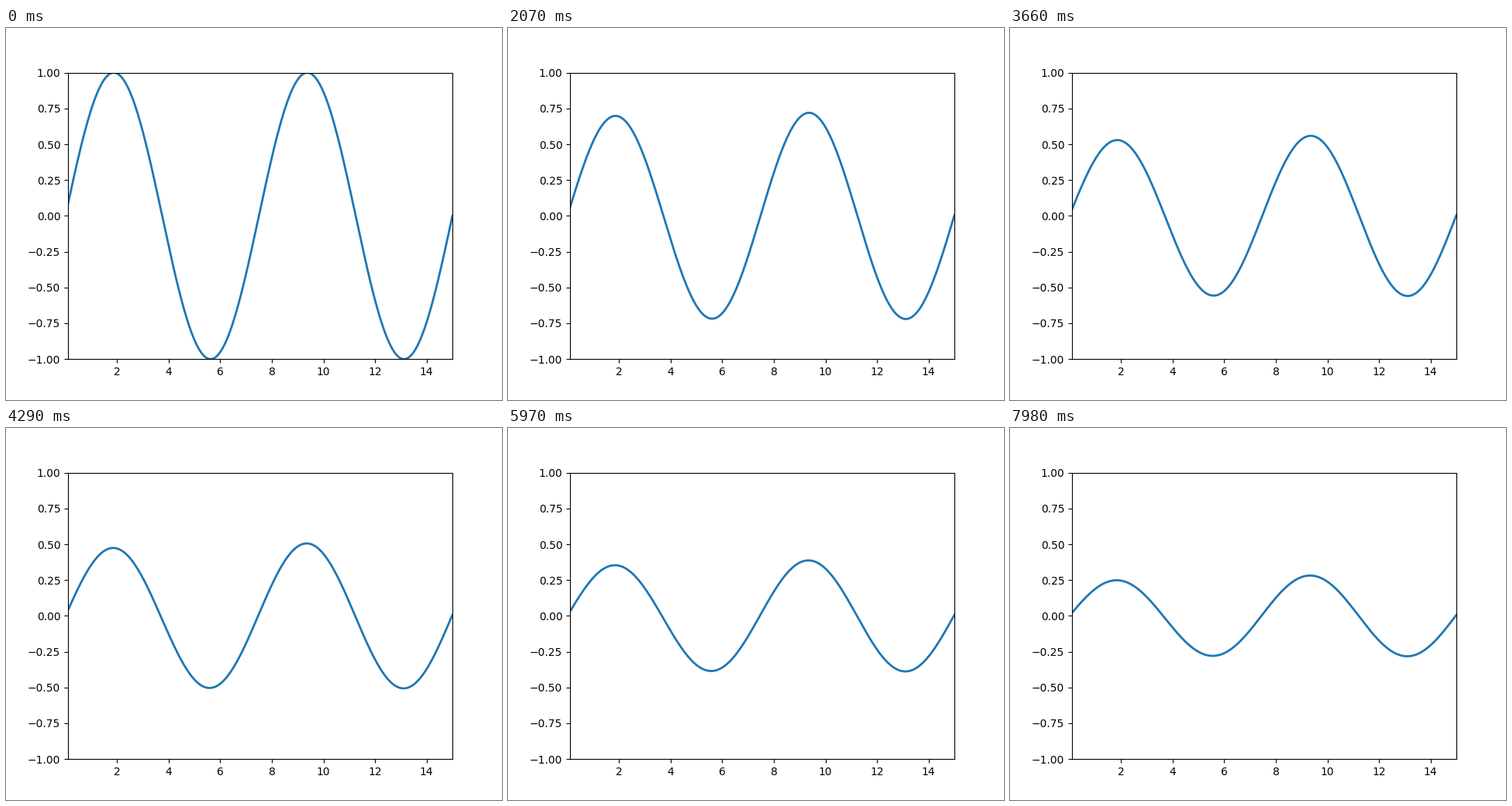
Animation, 640 px wide and 480 px high, one loop 8 s. Source, as a matplotlib script:

```python
import numpy as np
import matplotlib.pyplot as plt
from matplotlib.animation import FuncAnimation

LOOP_MS = 8000
FRAMES = 267
R_MIN, R_MAX = 0.1, 15.0
K = 4 * np.pi / R_MAX   # two full waves across the radius
DECAY = 0.00475         # uniform damping per frame
SPREAD = 0.00112        # radial correction per frame

r = np.linspace(R_MIN, R_MAX, 400)
z = K * r
wave = np.sin(z)
bend = np.sin(z) / z**2 - np.cos(z) / z   # spherical Bessel j1


def profile(step):
    """Damped sine whose inner part fades faster and drifts inward."""
    return np.exp(-DECAY * step) * (wave - SPREAD * step * bend)


fig, ax = plt.subplots(figsize=(6.4, 4.8), dpi=100)
ax.set_xlim(R_MIN, R_MAX)
ax.set_ylim(-1, 1)
line, = ax.plot(r, profile(0), color="tab:blue", lw=2)


def update(step):
    line.set_ydata(profile(step))
    return line,


anim = FuncAnimation(fig, update, frames=FRAMES, interval=LOOP_MS / FRAMES,
                     init_func=lambda: update(0), repeat=True, repeat_delay=0)
plt.show()
```
